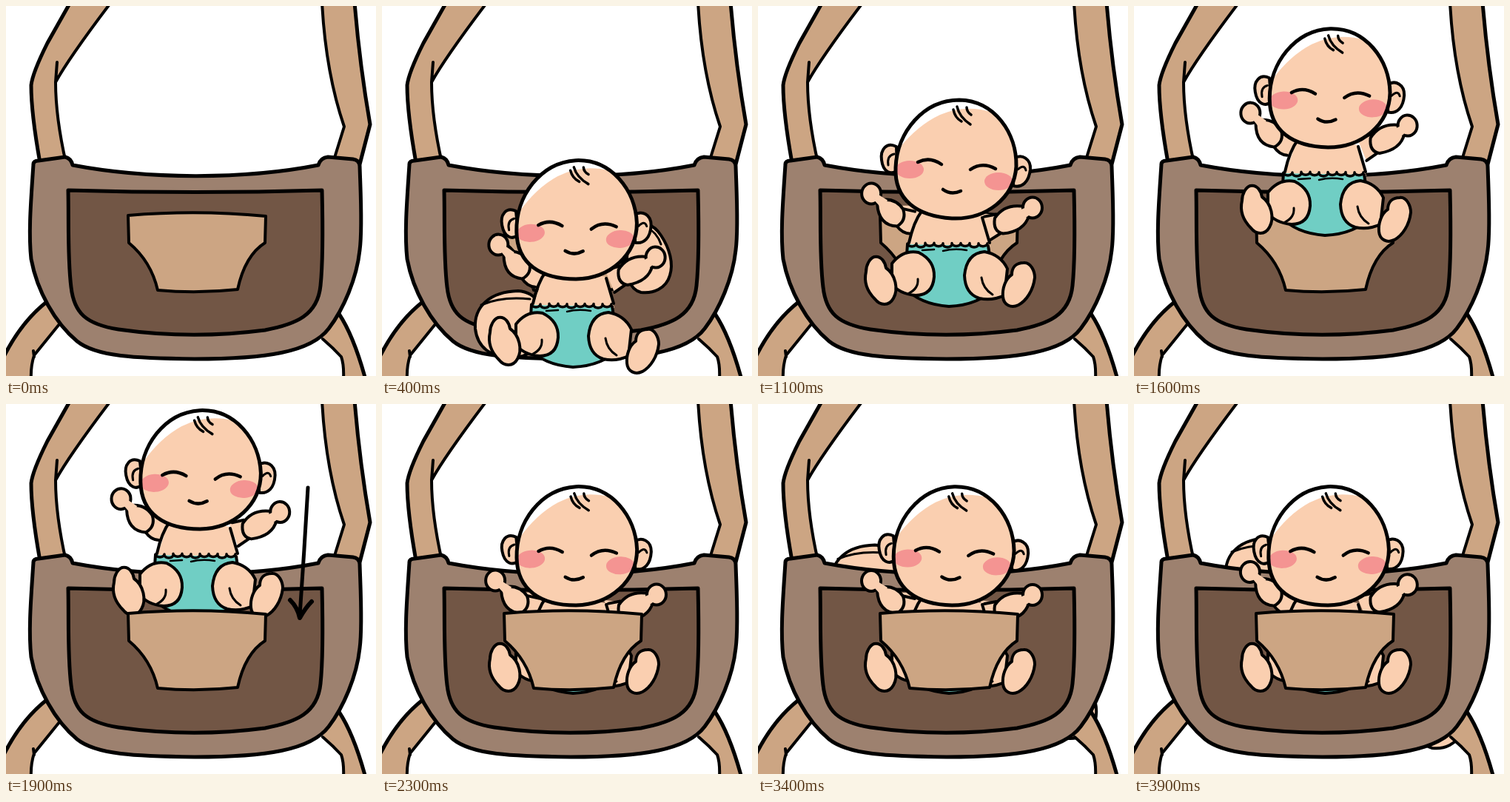
An HTML page with a canvas for the animation above (4 s loop, 500 px wide and 500 px high).

```html
<!DOCTYPE html>
<html>
<head>
<meta charset="utf-8">
<style>
html, body { margin: 0; width: 100%; height: 100%; overflow: hidden; background: #fff; }
canvas { display: block; width: 500px; height: 500px; }
</style>
</head>
<body>
<canvas id="stage" width="500" height="500"></canvas>
<script>
const ctx = document.getElementById('stage').getContext('2d');
const SKIN = '#facfb0', STRAP = '#cca583', BAG = '#9d816f', INNER = '#725645', TEAL = '#70cec4', BLUSH = '#f49492';
const LOOP = 4000, STEP = 100;

const clamp = (v, lo, hi) => Math.min(hi, Math.max(lo, v));
// Linear tween between two step numbers, held outside them.
const tween = (n, n0, n1, a, b) => a + (b - a) * clamp((n - n0) / (n1 - n0), 0, 1);

function shape(d, fill, width = 4) {
  const path = new Path2D(d);
  if (fill) { ctx.fillStyle = fill; ctx.fill(path); }
  if (width) { ctx.lineWidth = width; ctx.stroke(path); }
}
const line = (d, width = 4) => shape(d, null, width);

function oval(x, y, rx, ry, fill, width = 4) {
  ctx.beginPath();
  ctx.ellipse(x, y, rx, ry, 0, 0, Math.PI * 2);
  ctx.fillStyle = fill;
  ctx.fill();
  if (width) { ctx.lineWidth = width; ctx.stroke(); }
}

function shifted(x, y, draw) {
  ctx.save();
  ctx.translate(x, y);
  draw();
  ctx.restore();
}

function turned(x, y, angle, draw) {
  shifted(x, y, () => {
    ctx.rotate(angle);
    ctx.translate(-x, -y);
    draw();
  });
}

function drawStraps() {
  shape('M87 -5 L56 50 Q36 90 34 107 Q34 145 46 212 L82 212 Q68 150 67 103 L142 -5Z', STRAP, 0);
  line('M87 -5 L56 50 Q36 90 34 107 Q34 145 46 212', 5);
  line('M142 -5 Q85 70 67 103 Q67 150 81 212 M69 76 L67 103');
  shape('M427 -5 Q432 90 457 163 L443 208 L478 214 L492 160 Q478 80 471 -5Z', STRAP, 0);
  line('M427 -5 Q432 90 457 163 L443 208');
  line('M478 214 L492 160 Q478 80 471 -5', 5);
  shape('M56 399 Q20 427 -4 476 L-4 505 L34 505 L38 470 L72 430Z', STRAP, 0);
  line('M56 399 Q20 427 -4 476', 5);
  line('M72 430 L38 472 Q33 488 34 505 M37 466 L38 474');
  shape('M450 416 Q470 446 486 505 L456 505 L453 474 L428 448Z', STRAP, 0);
  line('M450 416 Q470 446 486 505', 5);
  line('M456 505 Q457 485 453 474 Q442 462 428 450');
}

function drawBag() {
  shape('M37 214 Q37 209 44 209 L80 204 Q88 206 90 215 C190 234 320 235 422 215 Q425 205 435 204 L469 207 Q477 208 478 216 ' +
    'C479 250 482 300 478 330 C474 368 456 410 436 436 C412 468 350 477 255 477 C175 476 122 474 96 453 C66 428 42 385 34 342 C30 305 34 260 37 214Z', BAG, 5);
  shape('M84 249 Q256 254 427 249 C428 290 429 340 425 378 C421 418 392 430 350 438 Q250 451 152 437 C108 430 92 415 88 380 C83 340 85 290 84 249Z', INNER, 5);
}

function drawPocket() {
  shape('M165 283 Q258 275 351 284 L350 320 Q323 337 313 383 Q258 389 205 384 Q196 345 166 320Z', STRAP);
}

function drawLeftPalm(x, y) {
  shifted(x, y, () => {
    shape('M-46 6 C-48 -24 -26 -44 12 -45 C38 -43 48 -22 47 4 C45 32 24 46 2 45 C-24 45 -43 32 -46 6Z', SKIN);
    line('M-38 -26 Q-10 -38 28 -34', 3);
  });
}

function drawRightPalm(x, y) {
  shifted(x, y, () => {
    shape('M-28 -38 C-12 -54 6 -44 15 -30 C27 -12 32 8 27 24 C22 42 4 49 -12 47 C-28 43 -32 25 -31 0Z', SKIN);
    line('M-6 -42 Q10 -34 15 -18', 3);
  });
}

function drawLeftArm() {
  shape('M224 270 L192 270 L186 296 L203 310 L216 300Z', SKIN, 0);
  line('M187 297 Q195 308 206 308 M194 274 L212 278');
  shape('M160 264 Q184 257 196 275 Q201 290 188 298 Q163 297 161 268Z', SKIN);
  oval(153, 254, 13, 14, SKIN);
  shape('M157 252 L175 263 L168 275 L157 263Z', SKIN, 0);
}

function drawRightArm() {
  shape('M300 280 L322 283 L328 308 L313 318Z', SKIN, 0);
  line('M306 285 L322 282 M313 317 L329 307');
  shape('M362 272 Q334 266 320 287 Q317 305 331 308 Q360 305 366 284Z', SKIN);
  oval(371, 273, 13, 14, SKIN);
  shape('M366 271 L352 277 L357 290 L368 282Z', SKIN, 0);
}

function drawBody() {
  shape('M222 272 L203 326 L314 326 L303 284Z', SKIN, 0);
  line('M222 276 Q210 292 204 320 M303 286 L313 320');
  shape('M202 322 L311 324 L320 380 Q300 404 258 406 Q218 403 198 380Z', TEAL, 0);
  line('M311 324 L320 380 Q300 404 258 406 Q218 403 198 380 L202 322');
  const scallops = 9;
  ctx.beginPath();
  for (let i = 0; i < scallops; i++) {
    ctx.ellipse(208 + i * 12, 321 + Math.sin(i * 2), 6, 4, 0, Math.PI, 0, true);
  }
  ctx.lineWidth = 3.5;
  ctx.stroke();
  line('M222 330 L238 329 M250 331 Q265 327 282 330', 2.5);
}

function drawLegs(kick) {
  shape('M181 348 Q196 329 217 333 Q239 344 238 366 Q236 391 213 391 Q190 389 181 375Z', SKIN);
  line('M204 388 Q217 382 216 369', 3);
  shape('M157 339 C167 337 172 347 173 354 C186 363 190 383 183 395 C177 406 165 405 158 396 C146 384 143 372 146 359 C146 350 151 341 157 339Z', SKIN);
  shape('M279 364 Q282 334 306 332 Q328 336 337 355 L333 391 Q316 399 299 395 Q280 389 279 364Z', SKIN);
  line('M302 367 Q304 382 317 390', 3);
  shifted(0, kick, () => {
    shape('M359 347 C369 346 374 359 374 367 C372 384 363 398 352 404 C342 409 332 404 331 393 C330 382 334 369 343 363 C343 353 349 347 359 347Z', SKIN);
  });
}

function drawHead() {
  shape('M187 190 C174 183 165 194 167 208 C169 225 180 229 188 222Z', SKIN);
  line('M184 200 Q174 202 176 215', 3);
  shape('M346 206 C357 199 369 207 368 221 C366 238 357 246 345 243Z', SKIN);
  line('M351 221 Q360 213 362 222', 3);
  const skull = 'M272 127 C320 128 350 172 349 217 C346 260 308 289 262 287 C215 284 184 262 186 218 C188 170 224 127 272 127Z';
  shape(skull, SKIN, 0);
  shape('M191 192 C204 150 236 126 272 127 Q299 128 318 144 Q280 132 246 147 Q216 161 191 192Z', '#fff', 0);
  oval(205, 221, 19, 12, BLUSH, 0);
  oval(325, 237, 19, 12, BLUSH, 0);
  line(skull, 5);
  line('M216 211 Q232 203 248 214 M287 221 Q303 210 321 220 M250 248 Q261 256 274 250', 4.5);
  line('M264 140 Q266 151 275 156 M269 136 Q272 150 287 160 M282 137 Q282 143 288 147', 3.5);
}

function drawBaby(n, y, kicking) {
  const wave = Math.cos((n - 4.3) * Math.PI / 6);
  const lift = (1 + wave) / 2;
  const sway = clamp(1.8 * Math.cos((n - 2) * Math.PI / 9), -1, 1);
  shifted(0, y, () => {
    shifted(2 * lift, -10 * lift, () => turned(212, 292, 0.06 * lift, drawLeftArm));
    shifted(0, -12 * lift, () => turned(312, 294, -0.06 * lift, drawRightArm));
    drawBody();
    drawLegs(kicking ? 8 * Math.max(0, wave) : 0);
    turned(262, 285, -0.0325 * (1 + sway), drawHead);
  });
}

function babyHeight(n) {
  if (n < 12) return tween(n, 0, 5, 410, 0);
  if (n < 19) return tween(n, 12, 17, 0, -120);
  return tween(n, 19, 23, -118, -15);
}

function render(time) {
  const n = Math.floor((time % LOOP) / STEP);
  ctx.fillStyle = '#fff';
  ctx.fillRect(0, 0, 500, 500);
  ctx.strokeStyle = '#000';
  ctx.lineCap = ctx.lineJoin = 'round';

  if (n > 24) {
    const reach = tween(n, 29, 35, 0, 1);
    drawLeftPalm(tween(n, 25, 29, -75, 25) + 145 * reach, 283 - 57 * reach);
    drawRightPalm(tween(n, 25, 29, 580, 495) - 80 * reach, 338 + 80 * reach);
  }
  drawStraps();
  drawBag();

  const y = babyHeight(n);
  const seated = n >= 18;
  if (!seated) {
    drawPocket();
    const away = tween(n, 6, 10, 0, 1);
    drawLeftPalm(172 - 240 * away, 348 + y);
    drawRightPalm(362 + 190 * away, 258 + y);
  }
  drawBaby(n, y, !seated);
  if (seated) drawPocket();

  if (n >= 17 && n < 23) {
    line('M408 113 Q403 200 397 286', 5);
    line('M384 265 Q394 275 397 289 Q405 275 413 267', 6);
  }
}

function tick() {
  render(performance.now());
  requestAnimationFrame(tick);
}
tick();
</script>
</body>
</html>
```
